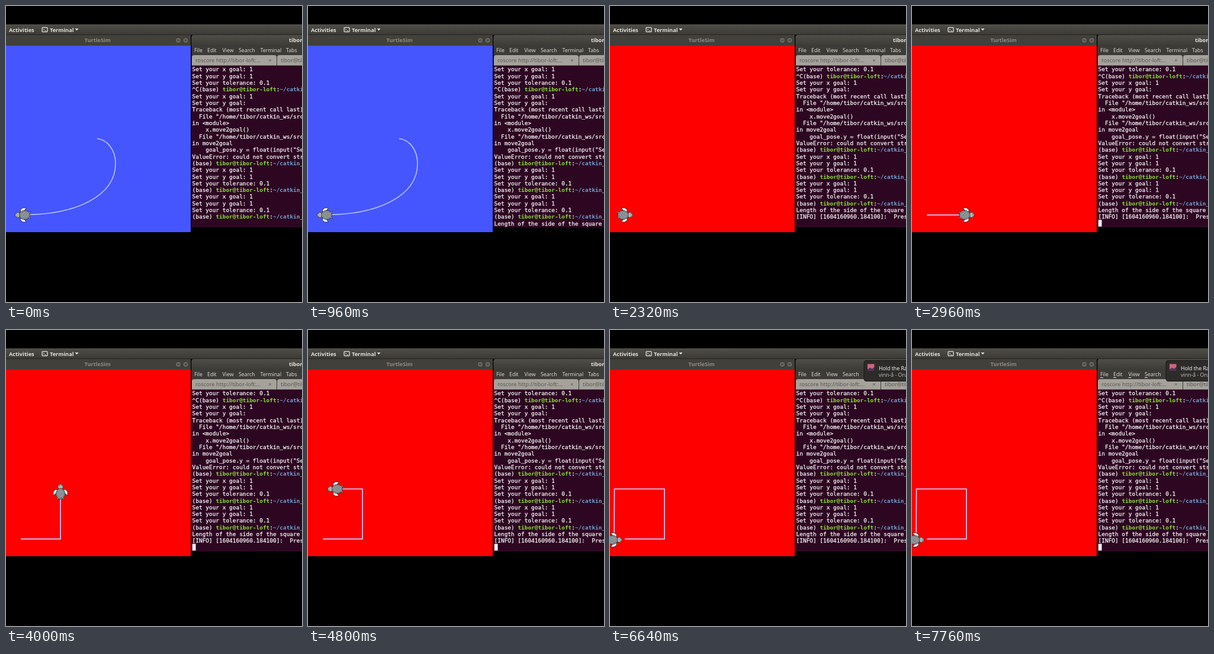
Recreate the animation shown at these times as an HTML page. Size 500 by 500 pixels, loop 8080 ms.

```html
<!DOCTYPE html>
<html lang="en">
<head>
<meta charset="utf-8">
<title>TurtleSim square</title>
<style>
html, body { margin: 0; width: 100%; height: 100%; overflow: hidden; background: #000; }
svg { display: block; width: 100vw; height: 100vh; }
text { white-space: pre; }
.ui { font: 500 8.8px "Open Sans", "Noto Sans", sans-serif; fill: #e4e1da; }
.bold { font-weight: 700; font-size: 9.2px; }
.tab { font-size: 9.3px; fill: #55524d; }
#term { font: 9.45px "DejaVu Sans Mono", "Noto Sans Mono", monospace; fill: #f4f2f3; stroke: #f4f2f3; stroke-width: .28; }
.user { font-weight: 700; fill: #8ae234; stroke: none; }
.dir { font-weight: 700; fill: #729fcf; stroke: none; }
</style>
</head>
<body>
<svg viewBox="0 0 500 500" xmlns="http://www.w3.org/2000/svg">
  <defs>
    <linearGradient id="bar" x2="0" y2="1">
      <stop offset="0" stop-color="#504e47"/>
      <stop offset="1" stop-color="#3b3a35"/>
    </linearGradient>
    <clipPath id="sea"><rect y="67" width="312" height="315"/></clipPath>
    <clipPath id="shell"><rect x="313" y="101" width="187" height="272.5"/></clipPath>
    <clipPath id="desk"><rect y="48" width="500" height="452"/></clipPath>
  </defs>
  <rect width="500" height="500" fill="#000"/>

  <!-- simulator window -->
  <rect y="48" width="312" height="20" fill="#42403a"/>
  <text class="ui bold" x="154.7" y="61" text-anchor="middle" style="fill:#8f8b81">TurtleSim</text>
  <g fill="#68655e" stroke="#2e2d29" stroke-width=".8">
    <circle cx="291" cy="58" r="4.8"/><circle cx="303.5" cy="58" r="4.8"/>
  </g>
  <path d="M289 58h4M302 56.5l3 3m0-3l-3 3" stroke="#35332f" stroke-width="1"/>
  <g clip-path="url(#sea)">
    <rect id="water" y="67" width="312" height="315"/>
    <path id="trail" fill="none"/>
    <g id="turtle" stroke="#24282a" stroke-width=".8" stroke-linejoin="round">
      <g fill="#eceeec">
        <path d="M4 -5L4 -9L0 -12L-6 -12L-3 -8L-1 -5Z"/>
        <path d="M4 5L4 9L0 12L-6 12L-3 8L-1 5Z"/>
        <path d="M-8 -4L-13 -6.5L-11 -2ZM-8 4L-13 6.5L-11 2Z"/>
      </g>
      <circle cx="8.7" r="4.4" fill="#b4b4b4"/>
      <ellipse cx="-3" rx="9" ry="7.6" fill="#90979a"/>
      <path d="M-8 -4L-3 -6L2 -4L4 0L2 4L-3 6L-8 4L-10 0ZM-6 0L-3 -3L0 0L-3 3Z" fill="none" stroke="#555c60" stroke-dasharray="1.6 1"/>
      <path d="M10 -1.8h1M10 1.8h1" stroke-width="1.2"/>
    </g>
  </g>

  <!-- terminal window -->
  <path d="M313.5 373.5V53q0-4 4-4H500V373.5Z" fill="#3c3b37"/>
  <path d="M313.5 68V53q0-4 4-4H500V68Z" fill="url(#bar)"/>
  <text class="ui bold" x="478" y="61">tibor@tibor-loft: ~/catkin_ws</text>
  <g id="menu" class="ui"></g>
  <path d="M314 101V87q0-4 4-4H453q4 0 4 4V101Z" fill="#a5a29b"/>
  <path d="M458 101V87q0-4 4-4H500V101Z" fill="#a5a29b"/>
  <text class="ui tab" x="320" y="95">roscore http://tibor-loft:…</text>
  <text class="ui tab" x="446" y="95" text-anchor="middle">×</text>
  <text class="ui tab" x="464" y="95">tibor@tibor-loft</text>
  <rect x="313.5" y="100.5" width="186.5" height="273" fill="#2d0722"/>
  <g clip-path="url(#shell)">
    <g id="term"></g>
    <rect id="cursor" x="314.8" y="361.3" width="5.7" height="11.2" fill="#fff"/>
  </g>

  <!-- notification -->
  <g clip-path="url(#desk)">
    <g id="note">
      <rect x="429" y="51.5" width="90" height="35" rx="4" fill="#2c2b29" stroke="#1b1a18"/>
      <rect x="435" y="57.5" width="11.5" height="11.5" fill="#4a3557"/>
      <path d="M435 57.5h11.5v5l-4 3l-3-2l-4.5 3Z" fill="#cf6580"/>
      <text class="ui" x="454" y="67.5" style="fill:#fff">Hold the Rain</text>
      <text class="ui" x="454" y="78.5" style="fill:#c9c7c3">vinn-å - Orulen</text>
    </g>
  </g>

  <!-- top panel -->
  <rect y="31" width="500" height="17.5" fill="url(#bar)"/>
  <rect y="48" width="500" height="1" fill="#252420"/>
  <text class="ui bold" x="5" y="43.6">Activities</text>
  <rect x="61" y="36.3" width="9" height="7.4" rx="1" fill="none" stroke="#e4e1da" stroke-width="1.3"/>
  <path d="M63 38.4l1.6 1.6l-1.6 1.6M65.5 41.8h2.5" fill="none" stroke="#e4e1da" stroke-width=".9"/>
  <text class="ui bold" x="74" y="43.6">Terminal</text>
  <path d="M116.5 38h6l-3 3.6Z" fill="#e4e1da"/>
</svg>
<script>
const LOOP = 8080, STEP = 80;
const PROMPT_AT = 800, START = 2240, NOTE_AT = 4800, ALT_AT = 7680;
const ROW = 11.32;
const $ = id => document.getElementById(id);
const clamp = v => Math.max(0, Math.min(1, v));
const show = (el, on) => el.setAttribute('visibility', on ? 'visible' : 'hidden');

// terminal text
const prompt = '(base) <tspan class="user">tibor@tibor-loft</tspan>:<tspan class="dir">~/catkin_ws/src</tspan>$';
const goal = ['Set your x goal: 1', 'Set your y goal: 1', 'Set your tolerance: 0.1'];
const file = '  File "/home/tibor/catkin_ws/src/turtle';
const lines = [
  ...goal, '^C' + prompt,
  goal[0], 'Set your y goal:',
  'Traceback (most recent call last):',
  file, 'in &lt;module&gt;', '    x.move2goal()',
  file, 'in move2goal', '    goal_pose.y = float(input("Set your y goal: "))',
  'ValueError: could not convert string to float',
  prompt, ...goal, prompt, ...goal, prompt,
  'Length of the side of the square : ',
  '[INFO] [1604160960.184100]:  Press Ctrl'
];
$('term').innerHTML = lines.map((s, i) =>
  `<text x="314.6" y="${(110.4 + i * ROW).toFixed(2)}">${s}</text>`).join('');
const rows = [...$('term').children];

// menu with mnemonic underlines
const menu = [['File', 318], ['Edit', 340], ['View', 365.5], ['Search', 393], ['Terminal', 429.5], ['Tabs', 473]];
$('menu').innerHTML = menu.map(([s, x]) => `<text x="${x}" y="78.2">${s}</text>`).join('') +
  '<path id="keys" stroke="#e4e1da" d="' +
  menu.slice(0, 4).map(([, x]) => `M${x} 80.5h5`).join('') + '"/>';

// square walk: move along each side, then turn left
const corners = [[25, 353], [92, 353], [92, 268.5], [7.5, 268.5], [7, 354.5]];
const WALK = 2400, SIDE = 709, FIRST = 560, TURN = 374;
const ARC = 'M154 224C172 226 185 244 185 266C185 321 118 353 28.5 352.5';

function walk(t) {
  let at = WALK, angle = 0, [x, y] = corners[0], d = `M${x} ${y}`;
  for (let i = 1; i < corners.length && t >= at; i++) {
    const time = i === 1 ? FIRST : SIDE;
    const p = clamp((t - at) / time);
    x += (corners[i][0] - x) * p;
    y += (corners[i][1] - y) * p;
    d += `L${x} ${y}`;
    at += time;
    angle -= 90 * clamp((t - at) / TURN);
    at += TURN;
  }
  return { x, y, angle, d };
}

function draw(t) {
  const live = t >= START;
  const pose = live ? walk(t) : { x: 28.5, y: 353, angle: 180, d: ARC };
  $('water').setAttribute('fill', live ? '#ff0000' : '#4556ff');
  $('trail').setAttribute('d', pose.d);
  $('trail').setAttribute('stroke', live ? '#c8b2e0' : '#c6cdff');
  $('trail').setAttribute('stroke-width', live ? 1.9 : 1.4);
  $('turtle').setAttribute('transform', `translate(${pose.x} ${pose.y}) rotate(${pose.angle})`);

  const count = live ? 25 : t >= PROMPT_AT ? 24 : 23;
  rows.forEach((row, i) => show(row, i < count));
  $('term').setAttribute('transform', `translate(0 ${live ? -2 * ROW : 0})`);
  show($('cursor'), live && t % 1200 < 600);

  const slide = 1 - clamp((t - NOTE_AT) / 200);
  $('note').setAttribute('transform', `translate(0 ${-40 * slide * slide})`);
  show($('note'), t >= NOTE_AT);
  show($('keys'), t >= ALT_AT);
}

function tick() {
  draw(Math.floor(performance.now() % LOOP / STEP) * STEP);
  requestAnimationFrame(tick);
}
tick();
</script>
</body>
</html>
```
